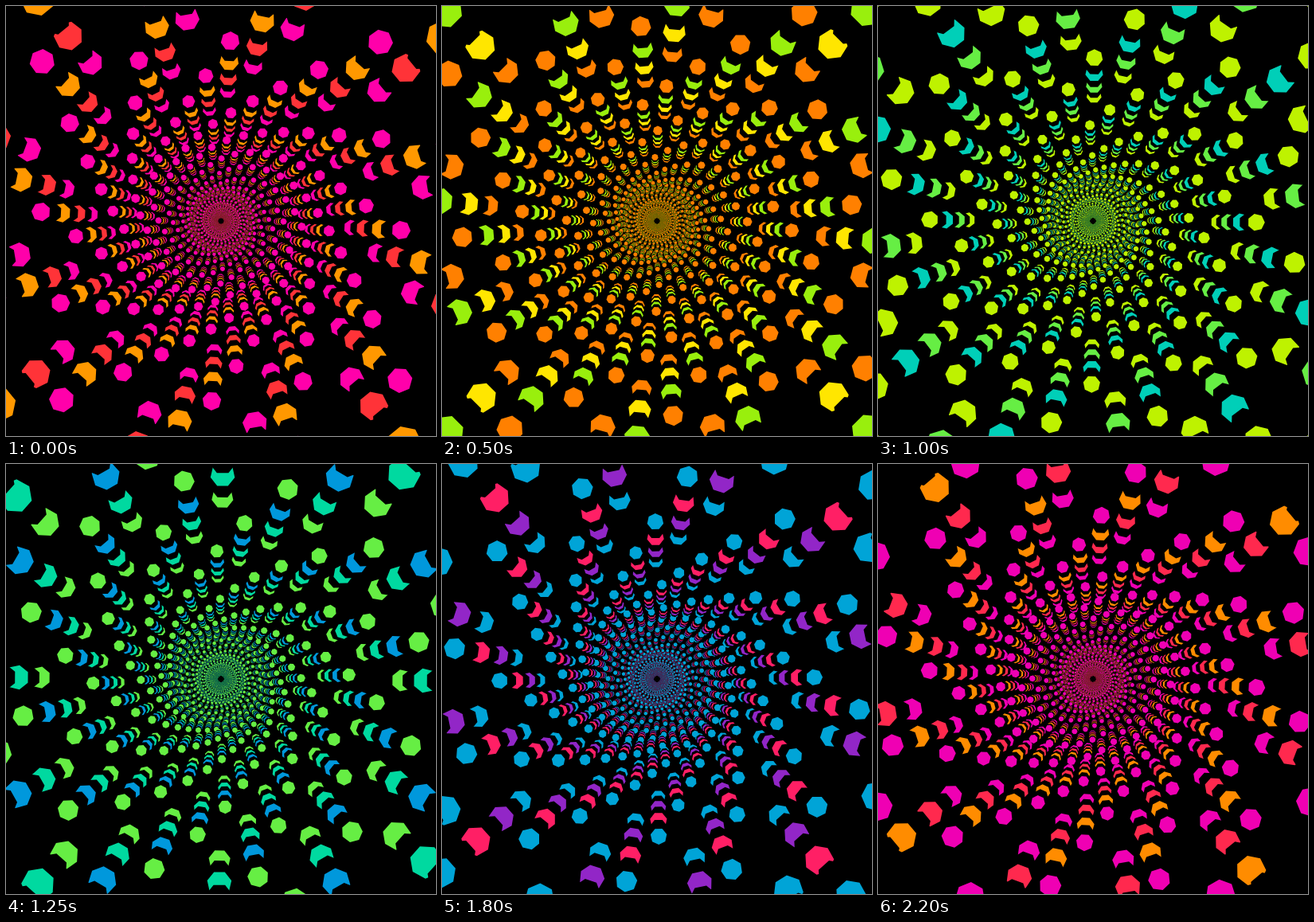
Animation of 540 by 540 pixels, one loop 2250 ms. Source, as an HTML page with a canvas:

```html
<!DOCTYPE html>
<html lang="en">
<head>
<meta charset="utf-8">
<title>Spiral tunnel</title>
<style>
html, body { margin: 0; width: 100%; height: 100%; overflow: hidden; background: #000; }
canvas { display: block; width: 540px; height: 540px; }
</style>
</head>
<body>
<canvas id="stage" width="540" height="540"></canvas>
<script>
const ctx = document.getElementById('stage').getContext('2d');
const TAU = Math.PI * 2, DEG = TAU / 360;
const FRAMES = 45, FRAME_MS = 50;
const CENTER = 270, COLUMNS = 12, SIDES = 7;
const DEPTH = 0.00112;      // inverse radius per ring
const SPEED = 18 / FRAMES;  // rings passed per frame
const RINGS = 220;

const palette = [
  [255, 0, 170], [255, 26, 112], [255, 51, 56], [255, 90, 32], [255, 128, 0], [255, 158, 0],
  [255, 230, 0], [250, 250, 0], [190, 242, 0], [144, 238, 16], [102, 238, 68], [54, 226, 106],
  [0, 217, 160], [0, 204, 190], [0, 176, 210], [0, 146, 222], [100, 64, 204], [216, 0, 192]
];

function colorAt(x) {
  const n = palette.length, i = Math.floor(x), f = x - i;
  const a = palette[i % n], b = palette[(i + 1) % n];
  return `rgb(${a.map((v, c) => Math.round(v + (b[c] - v) * f))})`;
}

// One ring of heptagons, each with a corner pointing outwards.
function drawRing(r, angle, size, color) {
  ctx.fillStyle = color;
  ctx.beginPath();
  for (let c = 0; c < COLUMNS; c++) {
    const a = angle + c * TAU / COLUMNS;
    const x = CENTER + r * Math.sin(a), y = CENTER - r * Math.cos(a);
    for (let i = 0; i < SIDES; i++) {
      const b = a + i * TAU / SIDES;
      const px = x + r * size * Math.sin(b), py = y - r * size * Math.cos(b);
      if (i) ctx.lineTo(px, py);
      else ctx.moveTo(px, py);
    }
    ctx.closePath();
  }
  ctx.fill();
}

function draw(frame) {
  ctx.fillStyle = '#000';
  ctx.fillRect(0, 0, 540, 540);
  const travel = frame * SPEED, hue = frame * palette.length / FRAMES;
  const base = colorAt(hue), mid = colorAt(hue + 2), front = colorAt(hue + 4.8);
  // From the inner tail to the head of each strand
  const strand = [base, '#000', mid, '#000', front, '#000', base];
  const first = Math.floor(travel) - 4;

  for (let k = first + RINGS; k >= first; k--) {
    const wave = k * 20 * DEG;
    const head = k + 2.97 - travel;
    const scale = DEPTH * (0.935 + 0.065 * Math.cos(wave + 6 * DEG));
    const angle = (11.7 - 10 * k + 3.6 * Math.sin(wave)) * DEG;
    strand.forEach((color, i) => {
      const z = head + (6 - i) / 4;
      if (z > 1.2) drawRing(1 / (z * scale), angle, i === 6 ? 0.053 : 0.061, color);
    });
  }
}

let shown = -1;
const start = performance.now();
function tick() {
  const frame = Math.floor((performance.now() - start) / FRAME_MS) % FRAMES;
  if (frame !== shown) draw(shown = frame);
  requestAnimationFrame(tick);
}
tick();
</script>
</body>
</html>
```
